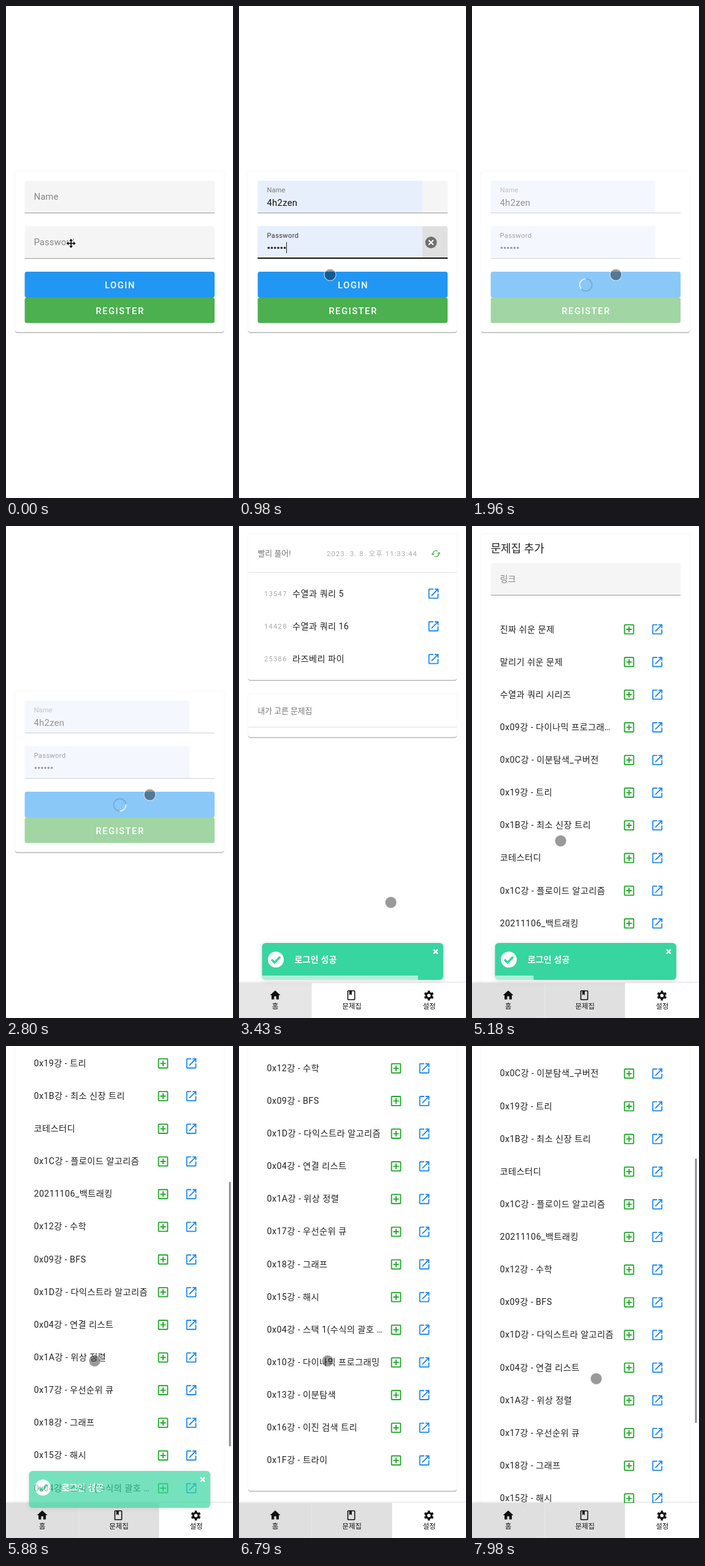
Write an HTML page that moves like this. It is 370x800 px and loops after 8000 ms.

```html
<!DOCTYPE html>
<html lang="ko">
<head>
<meta charset="utf-8">
<style>
html, body { margin: 0; width: 100%; height: 100%; overflow: hidden; background: #fff; }
svg { display: block; }
text { font-family: Roboto, "Noto Sans CJK KR", "Noto Sans CJK", sans-serif; white-space: pre; }
.card { fill: #fff; filter: drop-shadow(0 1px .6px #0006) drop-shadow(0 0 1px #0001); }
</style>
</head>
<body>
<svg id="stage" width="370" height="800" viewBox="0 0 370 800"></svg>
<script>
const LOOP = 8000, PITCH = 53.13, MAX_SCROLL = 663;
const BLUE = '#2196f3', GREEN = '#4caf50', INK = '#212121', GREY = '#858585';

const ICONS = {
  add: 'M19 19V5H5V19H19M19 3A2 2 0 0 1 21 5V19A2 2 0 0 1 19 21H5A2 2 0 0 1 3 19V5C3 3.9 3.9 3 5 3H19M11 7H13V11H17V13H13V17H11V13H7V11H11Z',
  open: 'M14 3V5H17.6L7.8 14.8L9.2 16.2L19 6.4V10H21V3M19 19H5V5H12V3H5C3.9 3 3 3.9 3 5V19A2 2 0 0 0 5 21H19A2 2 0 0 0 21 19V12H19Z',
  home: 'M10 20V14H14V20H19V12H22L12 3L2 12H5V20Z',
  book: 'M18 2A2 2 0 0 1 20 4V20A2 2 0 0 1 18 22H6A2 2 0 0 1 4 20V4A2 2 0 0 1 6 2H18M18 4H13V12L10.5 9.75L8 12V4H6V20H18Z',
  sync: 'M19 8L15 12H18A6 6 0 0 1 12 18C11 18 10 17.8 9.2 17.3L7.7 18.8C9 19.5 10.4 20 12 20A8 8 0 0 0 20 12H23M6 12A6 6 0 0 1 12 6C13 6 14 6.3 14.8 6.7L16.3 5.2C15 4.5 13.6 4 12 4A8 8 0 0 0 4 12H1L5 16L9 12'
};

const rect = (x, y, w, h, fill, more = '') =>
  `<rect x="${x}" y="${y}" width="${w}" height="${h}" fill="${fill}" ${more}/>`;
const circle = (x, y, r, more) => `<circle cx="${x}" cy="${y}" r="${r}" ${more}/>`;
const path = (d, more) => `<path d="${d}" ${more}/>`;
const text = (x, y, str, size = 14.8, fill = INK, ls = 0, more = '') =>
  `<text x="${x}" y="${y}" font-size="${size}" fill="${fill}" letter-spacing="${ls}" ${more}>${str}</text>`;
const itemText = (x, y, str) => text(x, y, str, 14.2, INK, .45);
const icon = (name, x, y, scale, fill) =>
  path(ICONS[name], `fill="${fill}" fill-rule="evenodd" transform="translate(${x} ${y}) scale(${scale}) translate(-12 -12)"`);
const openIcon = (x, y) => icon('open', x, y, .925, '#1e88ee');
const group = (id, content, more = '') => `<g id="${id}" ${more}>${content}</g>`;
const card = (y, h) => `<rect class="card" x="15" y="${y}" width="340" height="${h}" rx="4"/>`;
const field = (y, fill = '#f5f5f5') =>
  path(`M30.5 ${y + 52}V${y + 4}q0 -4 4 -4H336q4 0 4 4V${y + 52}Z`, `fill="${fill}"`);
const line = y => rect(30.5, y, 309.5, 1, '#999');
const cross = (x, y, r, width) =>
  path(`M${x - r} ${y - r}l${2 * r} ${2 * r}m0 ${-2 * r}l${-2 * r} ${2 * r}`, `stroke="#fff" stroke-width="${width}"`);

function loginPage() {
  const label = 'font-weight="500" text-anchor="middle"';
  const autofill = y => rect(30.5, y, 268.5, 52, '#e8effc');
  const dots = [0, 1, 2, 3, 4, 5].map(i => circle(48.3 + i * 5.25, 393.3, 1.75, `fill="${INK}"`)).join('');
  return card(269, 261.5) +
    group('fields',
      group('plain', field(284) + field(358)) +
      group('focus', field(358, '#e0e0e0')) +
      group('empty', text(45.5, 315, 'Name', 14.8, GREY, .1) + text(45.5, 389, 'Password', 14.8, GREY, .1)) +
      group('filled', autofill(284) + autofill(358) +
        text(45.5, 303, 'Name', 11.1, '#777', .1) + text(45.5, 325, '4h2zen', 14.8, '#111', .3) +
        text(45.5, 377, 'Password', 11.1, '#333', .35) + dots) +
      line(336) + line(410) +
      group('active', rect(30.5, 409, 309.5, 2, '#111') + rect(77, 384, 1, 18, '#222') +
        circle(313, 384.5, 9.5, 'fill="#707070"') + cross(313, 384.5, 3.8, 2))) +
    group('buttons',
      rect(30.5, 432, 309.5, 42, BLUE, 'rx="3.5"') + rect(30.5, 474, 309.5, 41.5, GREEN, 'rx="3.5"')) +
    text(186, 458.5, 'LOGIN', 14.8, '#fff', 1.5, label + ' id="loginText"') +
    text(186, 500.5, 'REGISTER', 14.8, '#fff', 1.5, label) +
    group('spinner',
      circle(185.5, 453.5, 10, 'fill="none" stroke="#0002" stroke-width="2"') +
      circle(185.5, 453.5, 10, 'id="arc" fill="none" stroke="#fffc" stroke-width="2" pathLength="360"'));
}

function homePage() {
  const problems = [[13547, '수열과 쿼리 5'], [14428, '수열과 쿼리 16'], [25386, '라즈베리 파이']];
  return card(13, 237.5) + card(273, 70.5) +
    rect(15, 75, 340, 1, '#dedede') + rect(15, 326.5, 340, 1, '#dedede') +
    text(30.5, 49, '빨리 풀어!', 12.9, '#757575') +
    text(143, 48.5, '2023. 3. 8. 오후 11:33:44', 11.1, '#aaa', 1.2) +
    icon('sync', 321, 45, .7, GREEN) +
    text(30.5, 304.5, '내가 고른 문제집', 12.8, '#757575') +
    problems.map(([id, name], i) => {
      const y = 110 + i * PITCH;
      return text(41, y + 4, id, 11.1, '#aaa', 1.3) + itemText(87, y + 5, name) + openIcon(317, y);
    }).join('');
}

function bookPage() {
  const titles = ['진짜 쉬운 문제', '말리기 쉬운 문제', '수열과 쿼리 시리즈', '0x09강 - 다이나믹 프로그래…',
    '0x0C강 - 이분탐색_구버전', '0x19강 - 트리', '0x1B강 - 최소 신장 트리', '코테스터디',
    '0x1C강 - 플로이드 알고리즘', '20211106_백트래킹', '0x12강 - 수학', '0x09강 - BFS',
    '0x1D강 - 다익스트라 알고리즘', '0x04강 - 연결 리스트', '0x1A강 - 위상 정렬', '0x17강 - 우선순위 큐',
    '0x18강 - 그래프', '0x15강 - 해시', '0x04강 - 스택 1(수식의 괄호 …', '0x10강 - 다이나믹 프로그래밍',
    '0x13강 - 이분탐색', '0x16강 - 이진 검색 트리', '0x1F강 - 트라이'];
  const row = (name, i) => {
    const y = 168 + i * PITCH;
    return itemText(45.5, y + 4.5, name) + icon('add', 256, y, .925, '#22a52a') + openIcon(302, y);
  };
  return card(13, 1373.5) + text(30.5, 43, '문제집 추가', 18, INK, 0, 'font-weight="500"') +
    field(60) + text(45.5, 90.5, '링크', 14.2, GREY) + line(112) +
    group('list', titles.map(row).join(''));
}

function navBar() {
  const label = (x, str) => text(x, 784.5, str, 11.5, '#111', 0, 'text-anchor="middle"');
  const cog = circle(309.5, 763.5, 4.4, 'fill="none" stroke="#111" stroke-width="3.2"') +
    circle(309.5, 763.5, 6.6, 'fill="none" stroke="#111" stroke-width="2.8" pathLength="12" stroke-dasharray="1 1" transform="rotate(15 309.5 763.5)"');
  return rect(0, 743, 370, 60, '#fff', 'style="filter:drop-shadow(0 0 2px #0003)"') +
    rect(0, 743, 118.5, 57, '#e3e3e3', 'id="homeTab"') + rect(118.5, 743, 131, 57, '#e0e0e0', 'id="bookTab"') +
    icon('home', 59, 763, .85, '#111') + icon('book', 183, 763, .8, '#111') + cog +
    label(59, '홈') + label(184, '문제집') + label(310, '설정');
}

function toastBox() {
  return `<clipPath id="round">${rect(37.5, 678, 295.5, 60, '#000', 'rx="6"')}</clipPath>` +
    rect(37.5, 678, 295.5, 60, '#37d5a0', 'rx="6" style="filter:drop-shadow(0 1px 4px #0002)"') +
    rect(37.5, 731, 295.5, 7, '#fff9', 'id="progress" clip-path="url(#round)"') +
    circle(60, 705, 13, 'fill="#fff"') +
    path('M53 705l5 5l9 -9.5', 'fill="none" stroke="#37d5a0" stroke-width="3.6"') +
    text(90.5, 710, '로그인 성공', 14.2, '#fff', 0, 'font-weight="700"') + cross(320.5, 692, 3.4, 2.3);
}

const arrows = [0, 90, 180, 270].map(a =>
  path('M-.8 0V-4H-3L0 -7.5L3 -4H.8V0Z', `transform="rotate(${a})"`)).join('');

stage.innerHTML = group('login', loginPage()) + group('home', homePage()) + group('book', bookPage()) +
  rect(363.5, 0, 3, 430, '#8c8c8c', 'id="thumb" rx="1"') +
  group('nav', navBar()) + group('toast', toastBox()) +
  group('mover', group('halo', arrows, 'stroke="#fff" stroke-width="2"') + arrows, 'transform="translate(106 386)"') +
  circle(.5, 0, 9.5, 'id="touch" fill="#0006" stroke="#fff8" stroke-width="1.5"');

const $ = id => document.getElementById(id);
const set = (id, name, value) => $(id).setAttribute(name, value);
const show = (id, on) => { $(id).style.display = on ? '' : 'none'; };
const clamp = x => Math.max(0, Math.min(1, x));
const span = (t, from, to) => clamp((t - from) / (to - from));
const ease = p => p * p * (3 - 2 * p);

// time, x, y
const TRACK = [[0, 106, 386], [520, 106, 386], [960, 148, 437], [1080, 148, 437], [1600, 234, 437], [2880, 234, 437],
  [3400, 247, 612], [3480, 247, 612], [3880, 183, 765], [4150, 183, 765], [4900, 144, 512], [7140, 144, 512], [7900, 202, 541]];

function pointer(t) {
  const i = TRACK.findIndex(k => k[0] > t);
  if (i < 0) return TRACK[TRACK.length - 1].slice(1);
  const a = TRACK[i - 1], b = TRACK[i], p = ease(span(t, a[0], b[0]));
  return [a[1] + (b[1] - a[1]) * p, a[2] + (b[2] - a[2]) * p];
}

function draw(t) {
  const filled = t >= 490, busy = t >= 1900, inside = t >= 3000, book = t >= 4020;

  show('login', !inside);
  show('empty', !filled);
  show('filled', filled);
  show('plain', !busy);
  show('focus', filled && !busy);
  show('active', filled && !busy);
  show('loginText', !busy);
  show('spinner', busy);
  set('fields', 'opacity', busy ? .45 : 1);
  set('buttons', 'opacity', busy ? .52 : 1);
  const turn = (t - 2800) / 1400;
  set('arc', 'stroke-dasharray', `${95 + 60 * Math.sin(turn * 2 * Math.PI)} 360`);
  set('arc', 'transform', `rotate(${turn * 360 - 5} 185.5 453.5)`);

  show('home', inside && !book);
  show('book', book);
  show('list', t >= 4200);
  show('nav', inside);
  show('bookTab', book);
  set('homeTab', 'fill', book ? '#dfdfdf' : '#e6e6e6');

  const scroll = MAX_SCROLL * ease(span(t, 5220, 6370)) - 327 * Math.max(0, t - 7100) / 880;
  set('book', 'transform', `translate(0 ${-scroll})`);
  set('thumb', 'y', scroll * .545);
  set('thumb', 'opacity', t < 7100 ? span(t, 5220, 5300) * (1 - span(t, 6420, 6720)) : span(t, 7100, 7180));

  const enter = span(t, 3040, 3300), leave = span(t, 5757, 6150);
  show('toast', enter > 0 && leave < 1);
  set('toast', 'transform', `translate(0 ${130 * ((1 - enter) ** 3 + leave * leave)})`);
  set('toast', 'opacity', Math.min(1, enter * 2) * (1 - leave));
  set('progress', 'width', 295.5 * (1 - span(t, 3054, 5757)));

  show('mover', t < 70);
  show('touch', t >= 70);
  set('touch', 'transform', `translate(${pointer(t)})`);
}

function frame() {
  draw(performance.now() % LOOP);
  requestAnimationFrame(frame);
}
frame();
</script>
</body>
</html>
```
